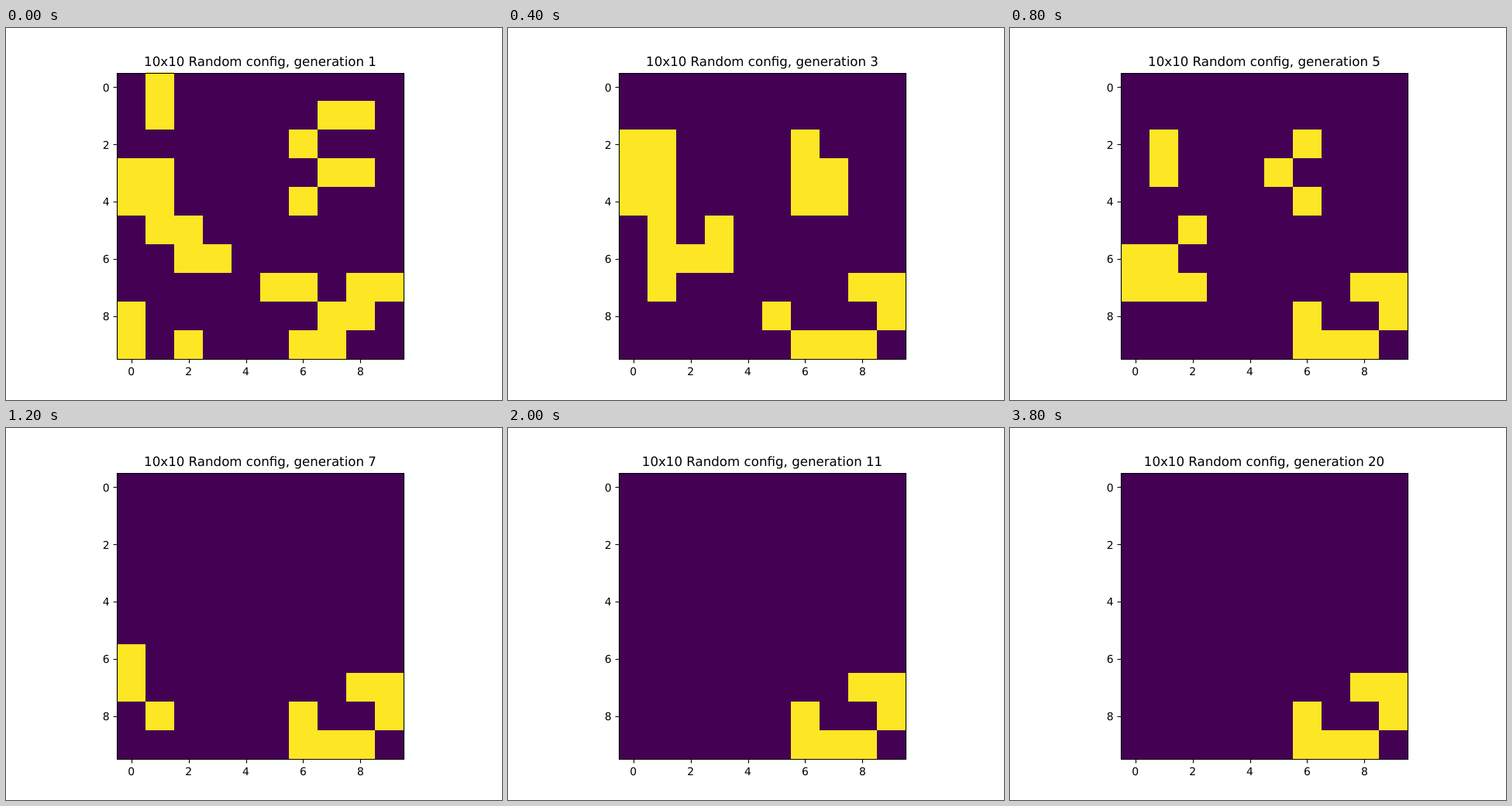
Write an HTML page that moves like this. It is 640 px wide and 480 px high and loops after 4000 ms.

```html
<!DOCTYPE html>
<html lang="en">
<head>
<meta charset="utf-8">
<title>Game of Life</title>
<style>
  html, body { margin: 0; width: 100%; height: 100%; overflow: hidden; background: #fff; }
  svg { display: block; }
  text { font: 13.889px "DejaVu Sans", sans-serif; text-anchor: middle; text-rendering: geometricPrecision; }
  #title { font-size: 16.667px; }
  #labels .row { text-anchor: end; }
  #frame { fill: none; stroke: #000; stroke-width: 1.11; }
</style>
</head>
<body>
<svg width="640" height="480" viewBox="0 0 640 480">
  <rect x="143" y="58" width="370" height="369" fill="#440154"/>
  <path id="cells" fill="#fde725" shape-rendering="crispEdges"/>
  <path id="frame"/>
  <g id="labels"></g>
  <text id="title" x="328" y="49"></text>
</svg>
<script>
const SIZE = 10, CELL = 37, LEFT = 143, TOP = 57;
const GENERATIONS = 20, STEP = 200;
const $ = id => document.getElementById(id);

const start = [
  ".#........",
  ".#.....##.",
  "......#...",
  "##.....##.",
  "##....#...",
  ".##.......",
  "..##......",
  ".....##.##",
  "#......##.",
  "#.#...##.."
].map(row => [...row].map(c => +(c === "#")));

// One Life step; everything outside the board is dead.
function evolve(grid) {
  return grid.map((row, r) => row.map((alive, c) => {
    let sum = -alive;
    for (let y = r - 1; y <= r + 1; y++)
      for (let x = c - 1; x <= c + 1; x++) sum += grid[y]?.[x] ?? 0;
    return +(sum === 3 || (alive && sum === 2));
  }));
}

function cellPath(grid) {
  let d = "";
  grid.forEach((row, r) => row.forEach((alive, c) => {
    if (alive) d += `M${LEFT + c * CELL} ${TOP + r * CELL}h${CELL}v${CELL}h-${CELL}z`;
  }));
  return d;
}

const paths = [];
for (let i = 0, grid = start; i < GENERATIONS; i++, grid = evolve(grid)) paths.push(cellPath(grid));

// Axes: border, tick marks and tick labels.
let lines = "M143.5 58.5H513.5V427.5H143.5Z", labels = "";
for (let n = 0; n < SIZE; n += 2) {
  const offset = 36.96 * (n + 0.5), x = 143.2 + offset, y = 57.6 + offset;
  lines += `M${Math.round(x) + 0.5} 427.5v5M143.5 ${Math.round(y) + 0.5}h-5`;
  labels += `<text x="${x}" y="448">${n}</text>`;
  labels += `<text class="row" x="133.5" y="${Math.round(y + 5.51)}">${n}</text>`;
}
$("frame").setAttribute("d", lines);
$("labels").innerHTML = labels;

let shown = -1;
function draw() {
  const i = Math.floor(performance.now() / STEP) % GENERATIONS;
  if (i !== shown) {
    shown = i;
    $("cells").setAttribute("d", paths[i]);
    $("title").textContent = `10x10 Random config, generation ${i + 1}`;
  }
  requestAnimationFrame(draw);
}
draw();
</script>
</body>
</html>
```
